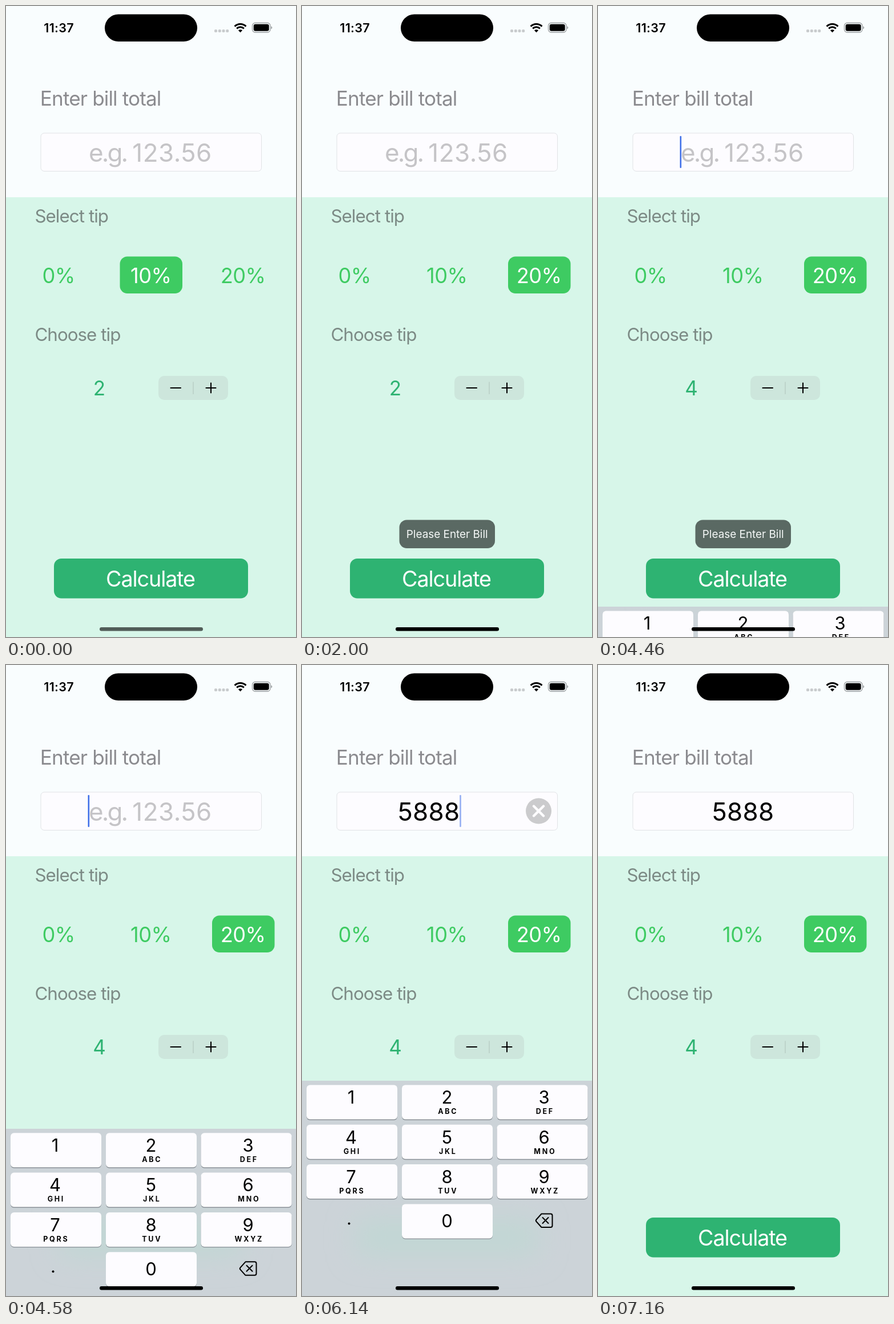
Recreate the animation shown at these times as an HTML page. Size 508 by 1102 pixels, loop 8000 ms.

```html
<!DOCTYPE html>
<html lang="en">
<head>
<meta charset="utf-8">
<title>Tip calculator</title>
<style>
  html, body { margin: 0; width: 100%; height: 100%; overflow: hidden; background: #d7f6e9; }
  svg { display: block; width: 100vw; height: 100vh; }
  text { font-family: Inter, Roboto, sans-serif; font-optical-sizing: none; }
  .mid { text-anchor: middle; }
  .label { font-size: 31.3px; letter-spacing: -.03em; fill: #7c8a85; }
  .choice { font-size: 36.2px; letter-spacing: -.016em; }
  .amount { font-size: 43.9px; }
  .digit { font-size: 31px; }
  .letters { font-size: 12.5px; font-weight: 700; letter-spacing: 2.7px; }
</style>
</head>
<body>
<svg id="stage" viewBox="0 0 508 1102">
  <defs>
    <filter id="soft" x="-50%" y="-100%" width="200%" height="300%"><feGaussianBlur stdDeviation="24"/></filter>
    <clipPath id="panel"><rect y="726" width="508" height="376"/></clipPath>
  </defs>

  <rect width="508" height="1102" fill="#d7f6e9"/>
  <rect width="508" height="334" fill="#f9fdfe"/>

  <!-- status bar -->
  <text class="mid" x="92.6" y="46" font-size="21.5" font-weight="600" letter-spacing=".3">11:37</text>
  <rect x="173" y="14.5" width="162" height="47.5" rx="23.75"/>
  <g fill="#c8cbcd">
    <rect x="365" y="41" width="5" height="5" rx="1.8"/>
    <rect x="371.8" y="41" width="5" height="5" rx="1.8"/>
    <rect x="378.5" y="41" width="5" height="5" rx="1.8"/>
    <rect x="385.2" y="41" width="5" height="5" rx="1.8"/>
  </g>
  <g fill="none" stroke="#000" stroke-width="3.1">
    <path d="M400.6 35.6a14 14 0 0 1 19.8 0"/>
    <path d="M404.2 39.3a9 9 0 0 1 12.6 0"/>
  </g>
  <path d="M410.5 46.3l-3.6-3.7a5.2 5.2 0 0 1 7.2 0z"/>
  <rect x="431.5" y="29.5" width="31.5" height="16.5" rx="5" fill="none" stroke="#9b9fa1" stroke-width="1.3"/>
  <rect x="433.7" y="31.7" width="27" height="12.1" rx="3.2"/>
  <path d="M464.3 35.2q2 .8 2 2.6t-2 2.6z" fill="#9b9fa1"/>

  <!-- bill -->
  <text x="59.8" y="174" font-size="35.1" letter-spacing="-.85" fill="#8b8b8f">Enter bill total</text>
  <rect x="61" y="222" width="386.5" height="66.5" rx="6" fill="#fdfcff" stroke="#e1e3e6"/>
  <g id="hint" class="amount" fill="#c5c4c7">
    <text x="145" y="272" letter-spacing="-2.9">e.g.</text>
    <text x="221.3" y="272" letter-spacing=".6">123.56</text>
  </g>
  <text id="bill" class="amount mid" y="272" letter-spacing=".3"></text>
  <g id="clear">
    <circle cx="414.5" cy="255" r="22.5" fill="#cbcbcd"/>
    <path d="M406 246.5l17 17m0-17l-17 17" stroke="#fdfcff" stroke-width="4.4" stroke-linecap="round"/>
  </g>
  <rect id="caret" y="227" width="2.6" height="56" rx="1.3" fill="#4070e8"/>

  <!-- tip -->
  <text class="label" x="50.4" y="378">Select tip</text>
  <rect id="pick" y="437.5" width="109.5" height="64.5" rx="13" fill="#3ecb62"/>
  <g id="choices"></g>
  <text class="label" x="50.4" y="585">Choose tip</text>
  <text id="count" class="mid" x="163.5" y="680" font-size="35" fill="#2eb372"></text>
  <rect x="267" y="646" width="122" height="42" rx="10" fill="#cde6dc"/>
  <path id="plus" d="M328 646h51a10 10 0 0 1 10 10v22a10 10 0 0 1-10 10h-51z" fill="#000" fill-opacity=".09"/>
  <path d="M328 656.5v21.5" stroke="#b5cbc1" stroke-width="1.3"/>
  <path d="M288.5 667h17.5M350.5 667h17M359 658.5v17" stroke="#000" stroke-width="2.1" stroke-linecap="round"/>

  <!-- action -->
  <rect x="84" y="965" width="340" height="69.5" rx="13" fill="#2eb372"/>
  <text id="action" class="mid" x="253" y="1014" font-size="37.7" letter-spacing="-1.1" fill="#fff">Calculate</text>
  <g id="toast">
    <rect x="170.5" y="897.5" width="167.5" height="49.5" rx="13" fill="#5a6963"/>
    <text class="mid" x="254.2" y="929" font-size="18.9" fill="#f6f9f8">Please Enter Bill</text>
  </g>

  <!-- keyboard -->
  <g id="board" clip-path="url(#panel)">
    <rect y="726" width="508" height="376" fill="#ccd3d8"/>
    <rect id="glow" x="94" y="968" width="320" height="64" rx="13" fill="#c1d7d4" filter="url(#soft)"/>
    <g id="keys"></g>
    <circle cx="82.5" cy="975.5" r="2"/>
    <path d="M419.5 958.5h16a3 3 0 0 1 3 3v17.5a3 3 0 0 1-3 3h-16l-9-10q-1.5-1.7 0-3.5zM421.5 965l10 10m0-10l-10 10" fill="none" stroke="#000" stroke-width="2" stroke-linejoin="round" stroke-linecap="round"/>
  </g>
  <rect id="home" x="164" y="1085" width="181" height="6.5" rx="3.25"/>
</svg>

<script>
const LOOP = 8000, TICK = 60, DROP = 376;
const $ = id => document.getElementById(id);
const between = (t, a, b) => t >= a && t < b;
const ramp = (t, a, b) => Math.min(1, Math.max(0, (t - a) / (b - a)));
const show = (id, on) => $(id).setAttribute('opacity', +on);

function add(parent, tag, attrs, text = '') {
  const el = document.createElementNS('http://www.w3.org/2000/svg', tag);
  for (const name in attrs) el.setAttribute(name, attrs[name]);
  el.textContent = text;
  return parent.appendChild(el);
}

// Critically damped spring from 0 to 1, as used by the sliding keyboard.
function spring(ms) {
  const x = Math.max(0, ms) * 0.01826;
  return 1 - (1 + x) * Math.exp(-x);
}

const choices = [['0%', 92], ['10%', 253.8], ['20%', 415]].map(([label, x]) =>
  add($('choices'), 'text', { class: 'choice mid', x, y: 484 }, label));

const keyX = [8, 175, 341.5], textX = [86, 254, 424];
const letters = ['', 'ABC', 'DEF', 'GHI', 'JKL', 'MNO', 'PQRS', 'TUV', 'WXYZ'];
const keys = {};

function addKey(digit, col, row, caption) {
  const y = 733.5 + row * 69.3;
  const box = { x: keyX[col], width: 159, height: 60, rx: 6 };
  add($('keys'), 'rect', { ...box, y: y + 1.4, fill: '#899096' });
  keys[digit] = add($('keys'), 'rect', { ...box, y });
  add($('keys'), 'text', { class: 'digit mid', x: textX[col], y: y + (row === 3 ? 40.3 : 32.8) }, digit);
  if (caption) add($('keys'), 'text', { class: 'letters mid', x: textX[col] + 1.8, y: y + 50.8 }, caption);
}
letters.forEach((caption, i) => addKey(i + 1, i % 3, Math.floor(i / 3), caption));
addKey(0, 1, 3);

// Each press: digit, time down, time up.
const presses = [[5, 5060, 5120], [8, 5240, 5300], [8, 5420, 5480], [8, 5660, 5780]];

// Dip to `low` while a button is held, then ease back.
const dip = (t, down, low) => t < down ? 1 : low + (1 - low) * ramp(t, down + 60, down + 300);

function drawTip(t) {
  const chosen = t < 1940 ? 1 : 2;
  $('pick').setAttribute('x', chosen === 1 ? 199.5 : 361);
  choices.forEach((el, i) => el.setAttribute('fill', i === chosen ? '#fff' : '#3ecb62'));
  choices[2].setAttribute('opacity', between(t, 1820, 1940) ? 0.35 : 1);
  $('count').textContent = t < 2720 ? 2 : t < 2960 ? 3 : 4;
  show('plus', between(t, 2720, 2840) || between(t, 2960, 3080));
}

function drawBill(t) {
  const typed = presses.filter(p => t >= p[2]).map(p => p[0]).join('');
  const editing = between(t, 4280, 6740);
  const clearable = editing && typed !== '';
  const center = clearable ? 222 : 254;
  const bill = $('bill');
  bill.textContent = typed;
  bill.setAttribute('x', center);
  show('hint', !typed);
  show('clear', clearable);
  $('caret').setAttribute('x', typed ? center + typed.length * 13.6 - 0.2 : 143.5);
  const blink = 1 - ramp(t, 6080, 6200) * 0.9 + ramp(t, 6320, 6440) * 0.9;
  show('caret', editing ? blink : 0);
}

function drawBoard(t) {
  const up = t < 6700 ? spring(t - 4424) : t < 7160 ? 1 - spring(t - 6715) : 0;
  const dy = DROP * (1 - up);
  $('board').setAttribute('transform', `translate(0 ${dy.toFixed(2)})`);
  $('glow').setAttribute('transform', `translate(0 ${(-dy).toFixed(2)})`);
  for (const digit in keys) {
    const held = presses.some(p => p[0] === +digit && between(t, p[1], p[2]));
    keys[digit].setAttribute('fill', held ? '#b0c3d0' : '#fdfcff');
  }
}

function draw(t) {
  drawTip(t);
  drawBill(t);
  drawBoard(t);
  show('action', t < 3380 ? dip(t, 500, 0.3) : dip(t, 3380, 0.3));
  show('toast', ramp(t, 560, 880) - ramp(t, 2740, 3120) + ramp(t, 3440, 3760) - ramp(t, 5600, 5980));
  $('home').setAttribute('fill-opacity', 0.62 + 0.38 * ramp(t, 440, 620));
}

function frame(now) {
  const t = now % LOOP;
  draw(Math.max(0, Math.floor((t - 20) / TICK) * TICK + 20));
  requestAnimationFrame(frame);
}
draw(0);
requestAnimationFrame(frame);
</script>
</body>
</html>
```
